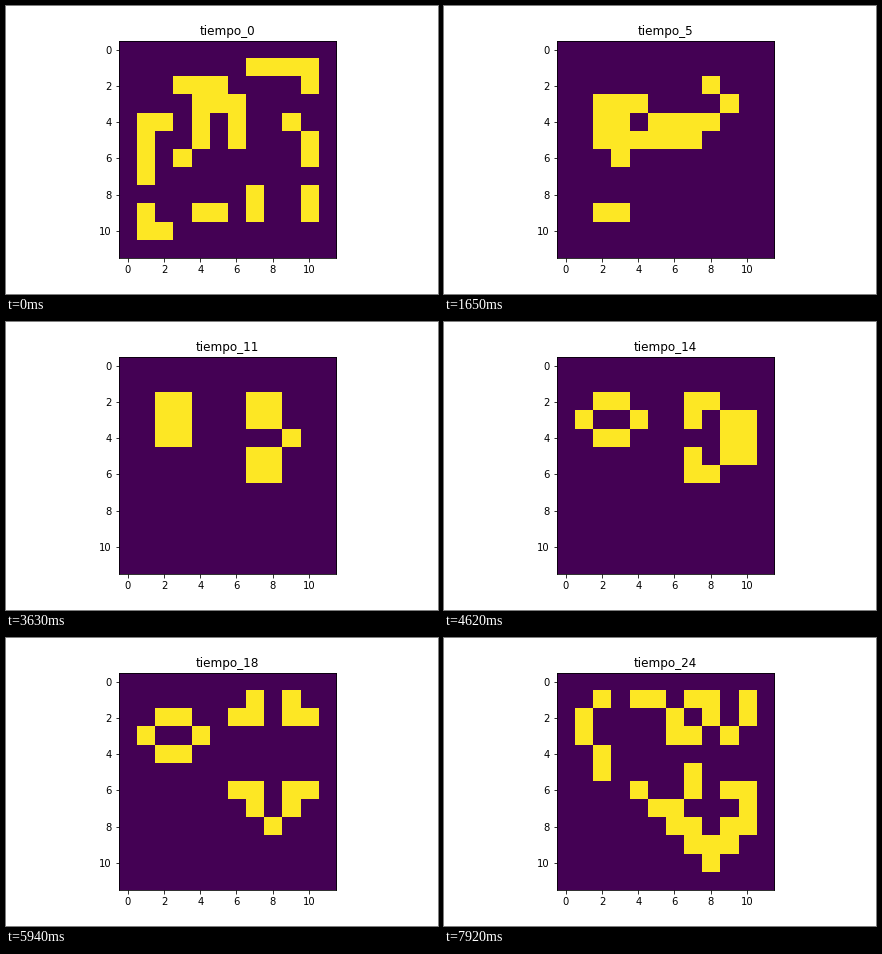
These frames come from a looping animation (432 px wide and 288 px high, 8000 ms). A matplotlib script:

```python
import matplotlib.pyplot as plt
import numpy as np
from matplotlib.animation import FuncAnimation

SIZE = 12
LOOP, STEP, TICK = 8000, 330, 20  # ms

# the starting colony: thick strokes through (column, row) corners
STROKES = [
    [(7, 1), (10, 1), (10, 2)],          # hook
    [(3, 2), (5, 2)],                    # cap
    [(4, 5), (4, 3), (6, 3), (6, 5)],    # arch
    [(2, 4), (1, 4), (1, 7)],            # hook
    [(1, 9), (1, 10), (2, 10)],          # corner
    [(10, 5), (10, 6)],                  # bars
    [(10, 8), (10, 9)],
    [(7, 8), (7, 9)],
    [(4, 9), (5, 9)],
    [(9, 4)],                            # dots
    [(3, 6)],
]


def first_grid():
    grid = np.zeros((SIZE, SIZE), int)
    for path in STROKES:
        for a, b in zip(path, path[1:] or path):
            (x0, x1), (y0, y1) = map(sorted, zip(a, b))
            grid[y0:y1 + 1, x0:x1 + 1] = 1
    return grid


def next_grid(grid):
    """One step of the Game of Life; the outer ring always stays dead."""
    n = SIZE - 1
    block = sum(grid[1 + dy:n + dy, 1 + dx:n + dx]
                for dy in (-1, 0, 1) for dx in (-1, 0, 1))
    inner = grid[1:n, 1:n]
    new = np.zeros_like(grid)
    new[1:n, 1:n] = (block == 3) | ((inner == 1) & (block == 4))
    return new


grids = [first_grid()]
while len(grids) * STEP < LOOP:
    grids.append(next_grid(grids[-1]))

fig, ax = plt.subplots(figsize=(6, 4), dpi=72)
fig.subplots_adjust(left=0.125, right=0.9, bottom=0.125, top=0.88)
image = ax.imshow(grids[0], cmap="viridis", vmin=0, vmax=1,
                  interpolation="nearest")
ax.set_xticks(range(0, SIZE, 2))
ax.set_yticks(range(0, SIZE, 2))
title = ax.set_title("tiempo_0", fontsize=12)


def draw(frame):
    # a step that falls inside this tick shows from the tick's start
    gen = (frame * TICK + TICK - 1) // STEP
    image.set_data(grids[gen])
    title.set_text(f"tiempo_{gen}")
    return image, title


anim = FuncAnimation(fig, draw, frames=LOOP // TICK, interval=TICK,
                     repeat=True, repeat_delay=0, blit=False)
plt.show()
```
